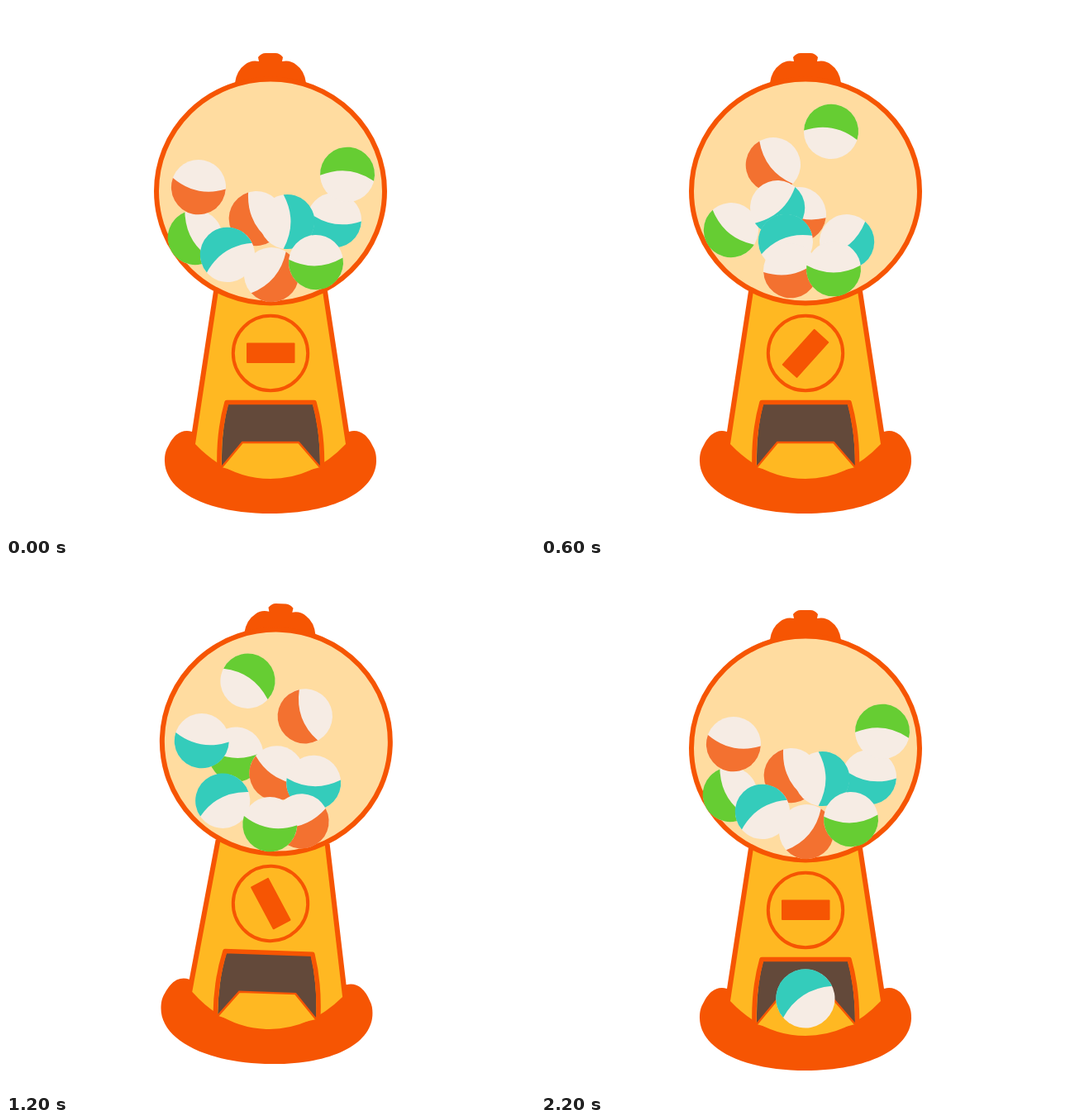
Animation, 640 px wide and 640 px high, one loop 2500 ms. Source, as an HTML page:

```html
<!DOCTYPE html>
<html lang="en">
<head>
<meta charset="utf-8">
<title>Capsule machine</title>
<style>
  html, body { margin: 0; width: 100%; height: 100%; overflow: hidden; background: #fff; }
  svg { display: block; width: 100vw; height: 100vh; }
  .shell { fill: #f65503; }
  .body { fill: #ffb822; }
  .line { fill: none; stroke: #f65503; }
</style>
</head>
<body>
<svg viewBox="0 0 640 640">
  <g id="machine">
    <path class="shell" d="M277 93Q279 78 289 71Q296 65 306 67L305 62Q309 57 314 57H326Q331 57 335 62L334 67Q344 65 351 71Q361 78 363 93Z"/>
    <path class="shell" d="M251 345L225 515Q207 510 196 533C192 540 192 546 192 551C193 588 245 614 320 614C395 614 447 588 448 551C448 546 448 540 444 533Q433 510 415 515L389 345Z"/>
    <path class="body" d="M257 345L229 530Q269 572 320 572Q371 572 411 530L383 345Z"/>

    <circle class="line" cx="320" cy="420" r="45.2" stroke-width="4"/>
    <rect id="knob" class="shell" x="291" y="407.5" width="58.5" height="24.5" rx="1"/>

    <path fill="#63493a" d="M261 556Q260 515 269 481H371Q380 515 380 556Z"/>
    <path class="body" d="M261 558L286 528H354L380 558L350 566H290Z"/>
    <path class="line" stroke-width="2.5" d="M261 558L286 528H354L380 558"/>
    <path class="line" stroke-width="5.5" stroke-linejoin="round" d="M258 557Q257 515 267 479.5H373Q383 515 382.5 557"/>

    <ellipse cx="320" cy="224" rx="138" ry="135.5" fill="#ffdca0" stroke="#f65503" stroke-width="6"/>
    <g id="balls"></g>
  </g>
</svg>
<script>
const STEP = 100, LOOP = 2500, SHAKE = 9, SHAKE_END = 17, DROP = 20;
const RADIUS = 33, HOP = 7;
const green = '#66cd33', teal = '#34ccbb', orange = '#f37130', white = '#f6ece4';

const machine = document.getElementById('machine');
const knob = document.getElementById('knob');
const globe = document.getElementById('balls');

function make(tag, attrs, parent) {
  const el = document.createElementNS('http://www.w3.org/2000/svg', tag);
  for (const key in attrs) el.setAttribute(key, attrs[key]);
  return parent.appendChild(el);
}

// Each pose is [x, y, angle].
function ball(color, parent, ...poses) {
  const el = make('g', {}, parent);
  make('circle', { r: 1, fill: white }, el);
  make('path', { d: 'M.99-.13A1 1 0 1 1-.99-.13Q0 .4 .99-.13Z', fill: color }, el);
  return { el, poses };
}

// Back to front: at rest, thrown left, thrown right.
const balls = [
  ball(green, globe, [229, 280, 60], [230, 271, 40], [272, 241, 0]),
  ball(orange, globe, [303, 257, 65], [312, 252, 15], [322, 262, 30]),
  ball(teal, globe, [397, 259, 10], [370, 285, -40], [367, 272, 0]),
  ball(green, globe, [413, 204, 186], [351, 152, 190], [283, 152, 213]),
  ball(orange, globe, [233, 219, 12], [281, 192, 52], [354, 192, 68]),
  ball(teal, globe, [340, 261, -90], [286, 244, -42], [230, 226, 8]),
  ball(teal, globe, [268, 301, 147], [296, 285, 160], [258, 298, 151]),
  ball(orange, globe, [321, 325, -50], [302, 320, -11], [354, 319, -22]),
  ball(green, globe, [375, 310, -2], [354, 318, 0], [316, 324, 8])
];
const prize = ball(teal, machine, [306, 302, 147], [320, 527, 147]);

const mix = (a, b, k) => a.map((v, i) => v + (b[i] - v) * k);

function place(el, [x, y, angle], r) {
  el.setAttribute('transform', `translate(${x} ${y}) rotate(${angle}) scale(${r})`);
}

// Rest, left, right, left and rest again, with a small hop between poses.
function toss([rest, left, right], step) {
  const [a, b, k] =
    step < 2 ? [rest, left, step / 2] :
    step < 3 ? [left, right, step - 2] :
    step < 6 ? [right, left, (step - 3) / 3] :
               [left, rest, (step - 6) / 2];
  const [x, y, angle] = mix(a, b, k);
  return [x, y - 4 * HOP * k * (1 - k), angle];
}

function tilt(step) {
  if (step === 2) return 'translate(0 -8) rotate(-1.8 320 485)';
  if (step === 3) return 'translate(0 -8) rotate(2 320 420)';
  return '';
}

function draw(time) {
  const tick = Math.floor(time % LOOP / STEP);
  const step = tick < SHAKE_END ? tick % SHAKE : SHAKE - 1;
  const turn = step <= 3 ? step * 20 : 60 + (step - 3) * 24;

  machine.setAttribute('transform', tilt(step));
  knob.setAttribute('transform', `rotate(${turn % 180} 320 420)`);
  for (const { el, poses } of balls) place(el, toss(poses, step), RADIUS);

  const fall = Math.min((tick - DROP) / 2, 1);
  prize.el.style.display = fall < 0 ? 'none' : '';
  place(prize.el, mix(...prize.poses, fall), 35.5);
}

const start = performance.now();
function loop() {
  draw(performance.now() - start);
  requestAnimationFrame(loop);
}
loop();
</script>
</body>
</html>
```
